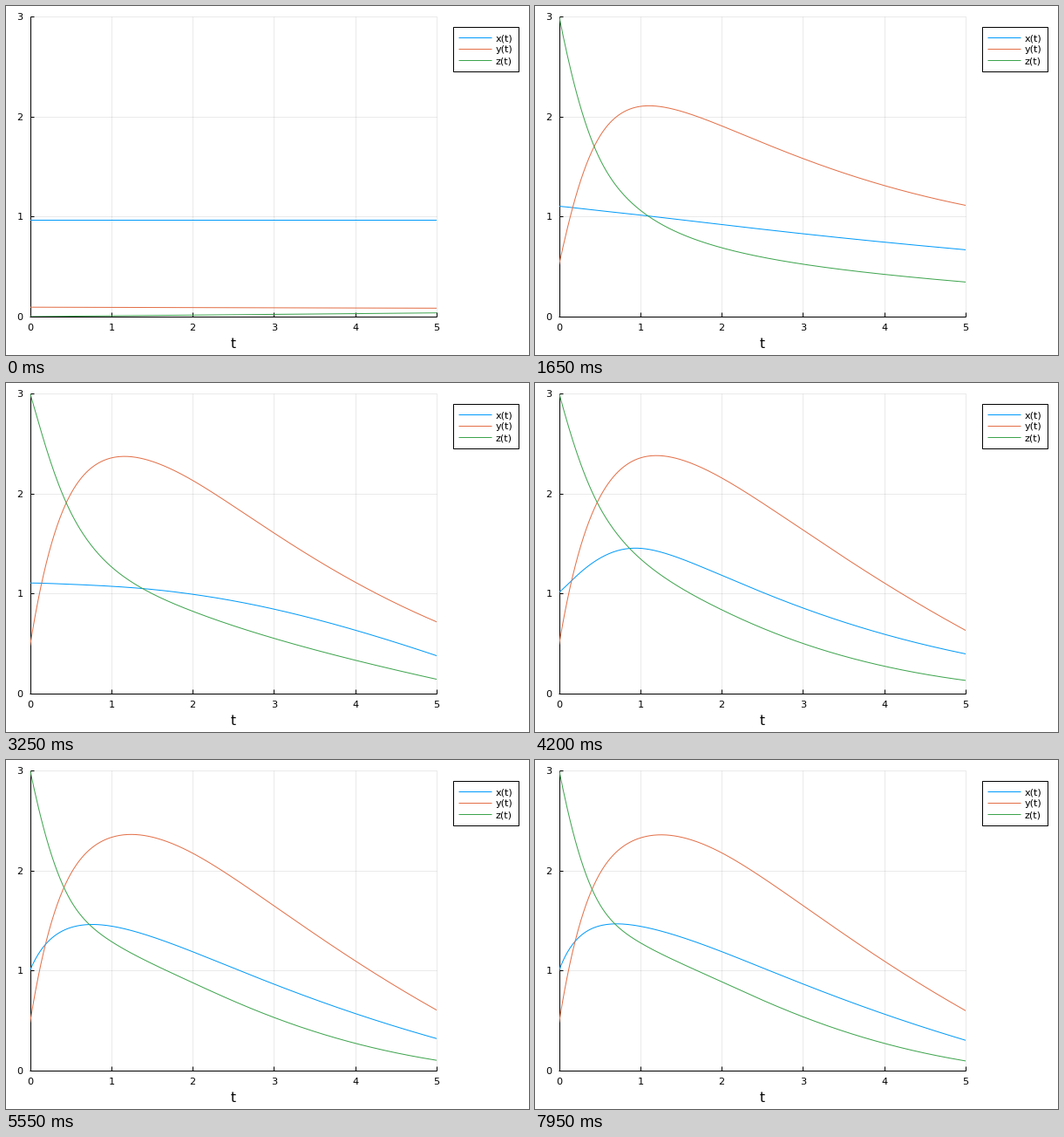
Write a matplotlib script that moves like this. It is 600x400 px and loops after 8000 ms.

```python
import numpy as np
import matplotlib.pyplot as plt
from matplotlib.animation import FuncAnimation
from matplotlib.patches import Rectangle

W, H, DPI = 600, 400, 100
FRAMES, STEP = 160, 50
LEFT, RIGHT, TOP, BOTTOM = 27.7, 493.7, 12, 355.5
PX = 72 / DPI  # one pixel in points
SERIES = {"x(t)": "#009afa", "y(t)": "#e36f47", "z(t)": "#3da44d"}

# Each stage holds x, y and z at these times; a spline joins them
NODES = np.array([0, .25, .5, 1, 2, 3.5, 5])
TIMES = [0, 1650, 3250, 4200, 7950]
FLAT = [.963 + 0 * NODES, .09 - .002 * NODES, .0074 * NODES - .004]
RISEN = [[1.1, 1.079, 1.056, 1.012, .917, .782, .665],
         [.52, 1.32, 1.8, 2.1, 1.905, 1.434, 1.11],
         [3, 2.13, 1.575, 1.06, .685, .465, .342]]
BENT = [[1.103, 1.098, 1.09, 1.07, .99, .743, .376],
        [.48, 1.46, 1.995, 2.355, 2.13, 1.347, .715],
        [3, 2.32, 1.81, 1.265, .82, .435, .14]]
HUMPED = [[1.01, 1.2, 1.35, 1.45, 1.18, .713, .394],
          [.49, 1.43, 1.96, 2.355, 2.155, 1.364, .63],
          [3, 2.33, 1.86, 1.345, .835, .372, .128]]
SETTLED = [[1, 1.335, 1.445, 1.44, 1.187, .708, .3],
           [.48, 1.45, 1.967, 2.325, 2.176, 1.366, .597],
           [3, 2.155, 1.66, 1.275, .885, .39, .093]]
STAGES = [np.array(s) for s in (FLAT, RISEN, BENT, HUMPED, SETTLED)]
# How sharply each stretch slows down; the first settles from left to right
RATES = [6 - NODES, 2, .05, 4.6]


def spline_basis(t):
    """Cubic spline basis on a logarithmic time axis."""
    s = np.log1p(2 * t)
    knots = np.log1p(2 * NODES[2:-2])
    cols = [s ** p for p in range(4)]
    cols += [np.clip(s - k, 0, None) ** 3 for k in knots]
    return np.stack(cols, axis=1)


T = np.linspace(0, 5, 301)
FIT = spline_basis(T) @ np.linalg.inv(spline_basis(NODES))


def ease_out(u, rate):
    return (1 - np.exp(-rate * u)) / (1 - np.exp(-rate))


def curves_at(ms):
    i = min(np.searchsorted(TIMES, ms, side="right") - 1, len(RATES) - 1)
    u = (ms - TIMES[i]) / (TIMES[i + 1] - TIMES[i])
    w = ease_out(u, RATES[i])
    return (STAGES[i] * (1 - w) + STAGES[i + 1] * w) @ FIT.T


def px(t):
    return LEFT + (RIGHT - LEFT) * t / 5


def py(v):
    return BOTTOM - (BOTTOM - TOP) * v / 3


fig = plt.figure(figsize=(W / DPI, H / DPI), dpi=DPI, facecolor="white")
ax = fig.add_axes([0, 0, 1, 1])
ax.set_xlim(0, W)
ax.set_ylim(H, 0)
ax.axis("off")


def segment(x0, y0, x1, y1, color="black", width=1, **kw):
    ax.plot([x0, x1], [y0, y1], color=color, lw=width * PX,
            solid_capstyle="butt", **kw)


def label(x, y, text, size=8.1, align="center"):
    ax.text(x, y, text, fontsize=size, ha=align, va="baseline",
            family="DejaVu Sans", color="black")


GRID = dict(width=.8, alpha=.1, zorder=1)
TICK = 4.7
for n in range(6):
    x = px(n)
    segment(x, TOP, x, BOTTOM, **GRID)
    segment(x, BOTTOM, x, BOTTOM - TICK)
    label(x, BOTTOM + 16, str(n))
for n in range(4):
    y = py(n)
    segment(LEFT, y, RIGHT, y, **GRID)
    segment(LEFT, y, LEFT + TICK, y)
    label(LEFT - 8, y + 4.2, str(n), align="right")
segment(LEFT, TOP, LEFT, BOTTOM + .5)
segment(LEFT - .5, BOTTOM, RIGHT, BOTTOM)
label(261, 392, "t", size=11)

ax.add_patch(Rectangle((512.5, 23.5), 75.5, 51.3, fc="white", ec="black", lw=PX))
window = Rectangle((LEFT, TOP - .5), RIGHT - LEFT, BOTTOM - TOP + 1,
                   transform=ax.transData)
lines = []
for n, (name, color) in enumerate(SERIES.items()):
    y = 36.4 + 12.9 * n
    segment(518.5, y, 556.5, y, color)
    label(562, y + 4, name, align="left")
    line, = ax.plot([], [], color=color, lw=PX, zorder=4)
    line.set_clip_path(window)
    lines.append(line)


def draw(frame):
    for line, values in zip(lines, curves_at(frame * STEP)):
        line.set_data(px(T), py(values))
    return lines


anim = FuncAnimation(fig, draw, frames=FRAMES, interval=STEP,
                     init_func=lambda: draw(0), repeat=True,
                     repeat_delay=0, blit=False)
plt.show()
```
